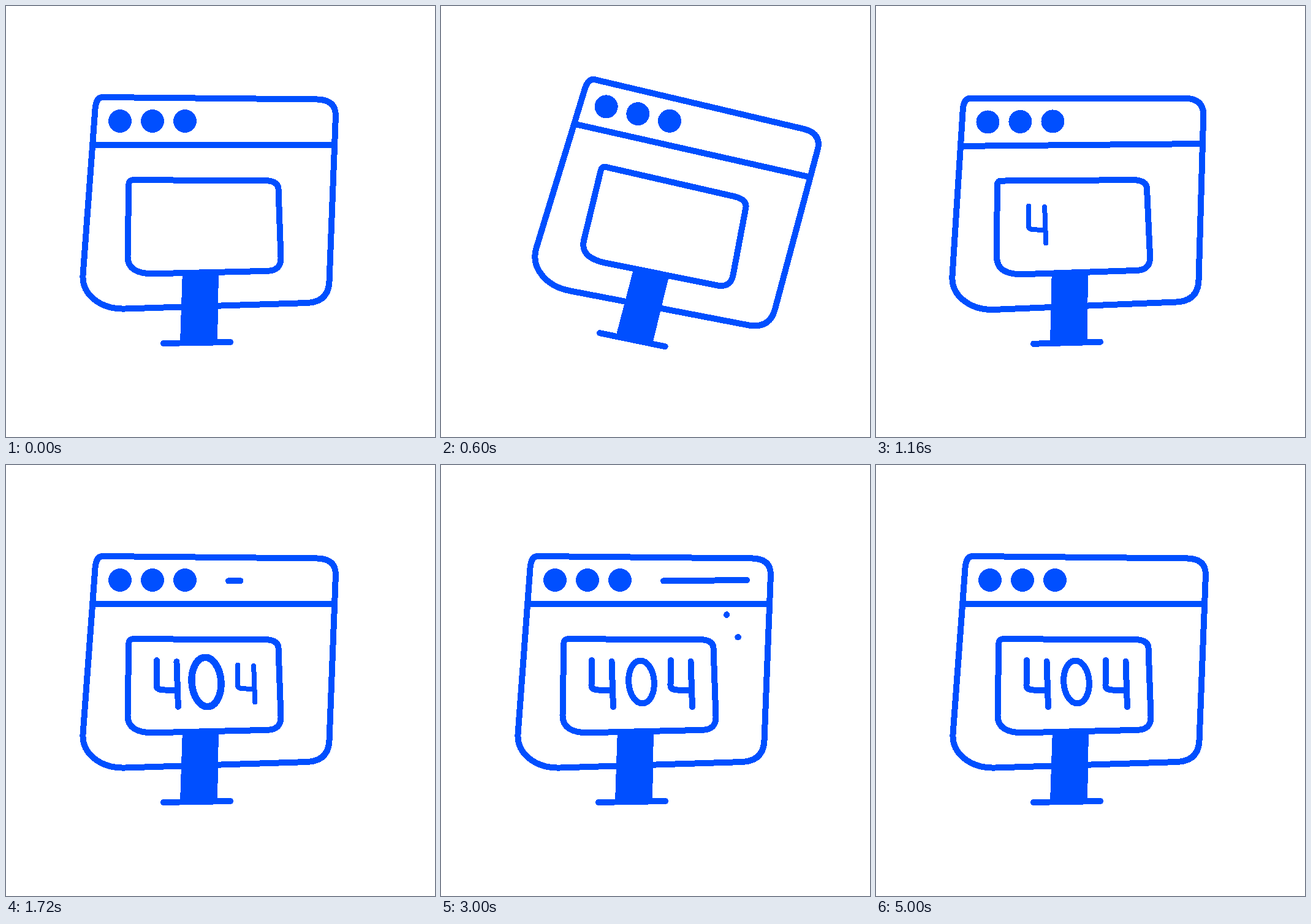
An HTML page that plays this animation: 700x704 px, repeating every 5.04 s.

```html
<!DOCTYPE html>
<html lang="en">
<head>
<meta charset="utf-8">
<title>404</title>
<style>
  html, body { margin: 0; width: 100%; height: 100%; overflow: hidden; background: #fff; }
  svg { display: block; width: 100%; height: 100%; }
  .line { fill: none; stroke: #004fff; stroke-width: 10; stroke-linecap: round; stroke-linejoin: round; }
  .solid { fill: #004fff; }
</style>
</head>
<body>
<svg viewBox="0 0 700 704" shape-rendering="crispEdges">
  <g id="device">
    <path class="line" d="M158 149 L508 152.500 Q537 153 538 178 L527.500 450 Q526 483 492 485 L195 494.500 C155 496 124 472 125.500 440 L145.500 168 Q147 149 158 149 Z"/>
    <path class="line" d="M145 227 H534"/>
    <g class="solid">
      <circle cx="186" cy="188" r="19"/>
      <circle cx="239" cy="188" r="19"/>
      <circle cx="292" cy="188" r="19"/>
    </g>
    <path class="line" d="M207 284.300 L422 285 Q444 285.500 444.500 299 L448.500 411 Q449 431.500 428 432.800 L240 437.300 Q198.500 437.500 198.500 409 L200.300 292 Q200.500 284.300 207 284.300 Z"/>
    <path class="solid" d="M288 432 H347 L345 550 H284 Z"/>
    <path class="line" d="M257 551 L366 549"/>
  </g>
  <g id="digits" class="line">
    <path d="M246 319 L245.500 360 Q245.500 367 257 367.500 L279 368 M278.500 321 L281 395"/>
    <ellipse cx="327" cy="354.500" rx="20.800" ry="35"/>
    <path d="M375 319 L374.500 360 Q374.500 367 386 367.500 L408 368 M407.500 321 L410 395"/>
  </g>
  <path id="address" class="line"/>
  <path id="rayUp" class="line"/>
  <path id="raySide" class="line"/>
</svg>
<script>
const LOOP = 5040, STEP = 40;
const get = id => document.getElementById(id);
const device = get('device');
const digits = [...get('digits').children];
const digitCenters = [[262, 357], [327, 354.5], [391, 357]];

const tilt = [[0, 0], [0.36, 11.75], [0.635, 11.75], [0.72, 0]];

// Linear keys; each key rings on with the speed it was reached at.
function spring(keys, t) {
  const i = keys.findLastIndex(([time]) => time <= t);
  if (i < 0) return keys[0][1];
  const [t0, v0] = keys[i];
  const next = keys[i + 1], prev = keys[i - 1];
  let value = next ? v0 + (next[1] - v0) * (t - t0) / (next[0] - t0) : v0;
  if (prev) {
    const speed = (v0 - prev[1]) / (t0 - prev[0]);
    const dt = t - t0;
    value += 0.1 * speed * Math.sin(2 * Math.PI * dt) * Math.exp(-5 * dt);
  }
  return value;
}

function ease(t, start, duration) {
  const x = Math.min(1, Math.max(0, (t - start) / duration));
  return x * x * (3 - 2 * x);
}

// Shows the part of a segment between two fractions of its length.
function trim(id, [x1, y1, x2, y2], from, to) {
  const at = f => `${x1 + (x2 - x1) * f} ${y1 + (y2 - y1) * f}`;
  get(id).setAttribute('d', to > from ? `M${at(from)} L${at(to)}` : '');
}

function draw(t) {
  device.setAttribute('transform', `rotate(${spring(tilt, t)} 333.5 551)`);

  digits.forEach((digit, i) => {
    const start = 1 + 0.28 * i;
    const size = spring([[start, 0], [start + 0.2, 1]], t);
    const [x, y] = digitCenters[i];
    const lean = i === 1 ? -4 : 0;
    digit.setAttribute('transform',
      `translate(${x} ${y}) scale(${size}) rotate(${lean}) translate(${-x} ${-y})`);
    digit.style.display = size > 0 ? '' : 'none';
  });

  trim('address', [363, 189.3, 499, 188], ease(t, 4.2, 0.8), ease(t, 1.53, 0.8));

  const tail = ease(t, 3.16, 0.2), head = ease(t, 2.98, 0.2);
  trim('rayUp', [466.3, 244.3, 453, 266], tail, head);
  trim('raySide', [485, 281.2, 462, 288], tail, head);
}

function tick() {
  const ms = performance.now() % LOOP;
  draw(Math.floor(ms / STEP) * STEP / 1000);
  requestAnimationFrame(tick);
}
tick();
</script>
</body>
</html>
```
